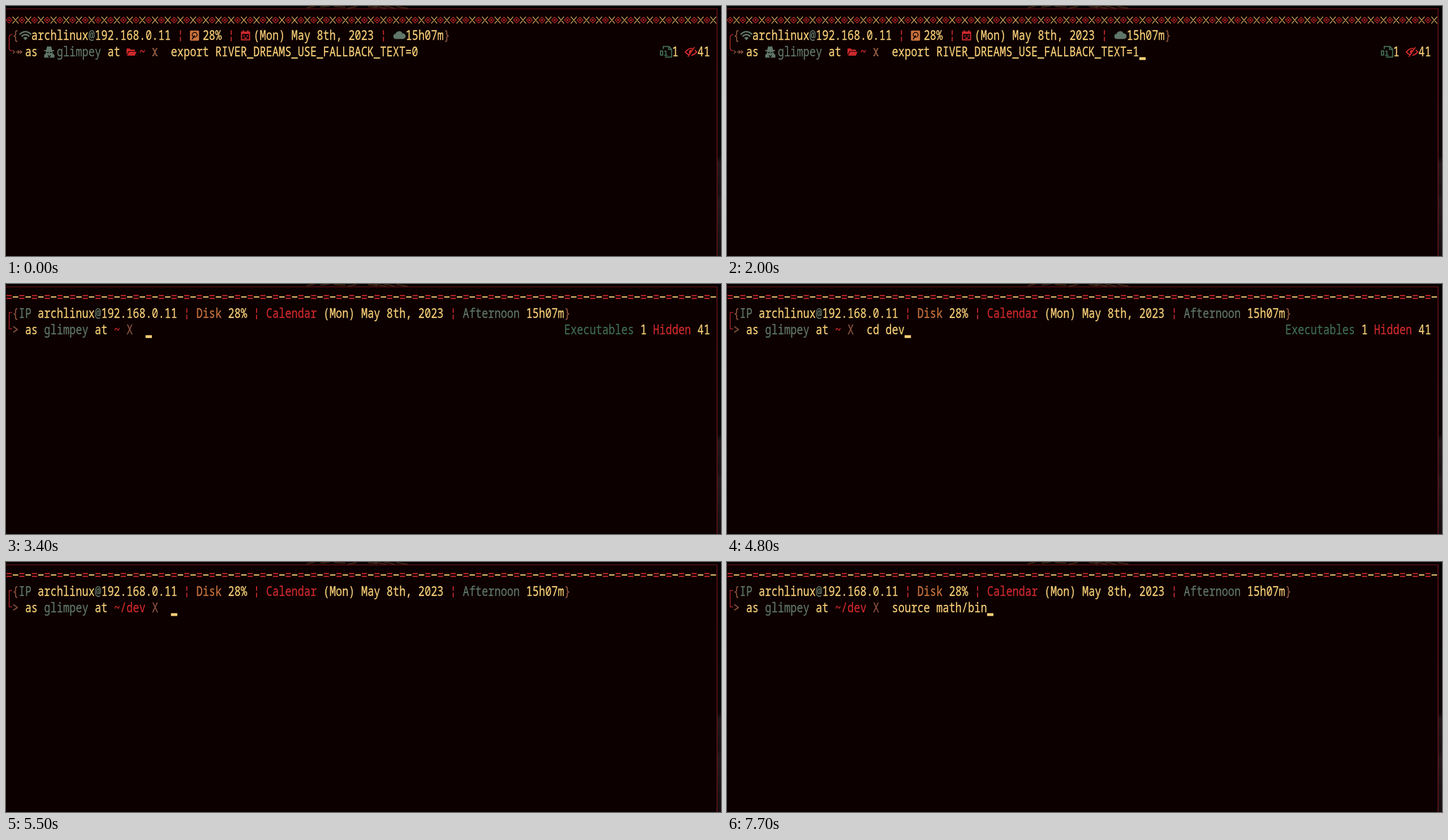
These frames come from a looping animation (1264 px wide and 443 px high, 8 s). An HTML page:

```html
<!DOCTYPE html>
<html lang="en">
<head>
<meta charset="utf-8">
<title>Shell prompt</title>
<style>
  html, body { margin: 0; width: 100%; height: 100%; overflow: hidden; background: #0d0000; }
  svg { display: block; width: 100vw; height: 100vh; }
  text { font: 500 18.69px "Noto Sans Mono", monospace; white-space: pre; stroke-width: .25; }
</style>
</head>
<body>
<svg viewBox="0 0 1264 443">
  <defs>
    <linearGradient id="edge" x1="0" y1="0" x2="0" y2="1">
      <stop offset="0" stop-color="#050203"/>
      <stop offset=".6" stop-color="#080405"/>
      <stop offset=".63" stop-color="#211719"/>
      <stop offset=".75" stop-color="#181012"/>
      <stop offset=".78" stop-color="#23191b"/>
      <stop offset="1" stop-color="#140d0f"/>
    </linearGradient>
  </defs>
  <rect width="1264" height="443" fill="#0d0000"/>
  <rect width="1264" height="4.5" fill="#070203"/>
  <rect x="1257" width="7" height="443" fill="url(#edge)"/>
  <path d="M532 3l14-3M556 2l16-2M580 1l20 1M604 4l16-3M640 1l16 2M650 0l22 4M668 0l20 4M690 1l20 3" stroke="#3f2516" stroke-width="2" fill="none"/>
  <path d="M0 5H1257V443" fill="none" stroke="#80191f" stroke-width="1.2"/>
  <g id="screen"></g>
</svg>
<script>
const GOLD = '#f7cf78', RED = '#cc292c', SAGE = '#5f7668', GREEN = '#3f6b51',
      ORANGE = '#c9733d', BROWN = '#8e5642', RUST = '#a8282a', BG = '#0d0000';
const COLS = 112, CELL = 1256 / COLS, ROW = 29, LOOP = 8000;
const USER = 'glimpey', DATE = '(Mon) May 8th, 2023', CLOCK = '15h07m', ADDRESS = '192.168.0.11';

const colX = col => col * CELL;
const baseline = row => 31 + row * ROW;
const shift = (row, body) => `<g transform="translate(0 ${row * ROW})">${body}</g>`;
const stroke = (d, color, width = 2) =>
  `<path d="${d}" fill="none" stroke="${color}" stroke-width="${width}"/>`;
const fill = (d, color) => `<path d="${d}" fill="${color}" fill-rule="evenodd"/>`;

// Consecutive color/string pairs set on the character grid.
function line(row, col, ...parts) {
  let out = '';
  for (let i = 0; i < parts.length; i += 2) {
    const [color, string] = [parts[i], parts[i + 1]];
    out += `<text transform="translate(${colX(col)} ${baseline(row)}) scale(1 1.22)" fill="${color}" stroke="${color}">${string}</text>`;
    col += string.length;
  }
  return out;
}

// Two alternating path builders, one per column.
function border(even, odd) {
  const d = ['', ''];
  for (let c = 0; c < COLS; c++) d[c % 2] += (c % 2 ? odd : even)(colX(c + 0.5));
  return d;
}

const [diamonds, crosses] = border(
  x => `M${x - 5.2} 25l5.2-5.2 5.2 5.2-5.2 5.2zM${x - 1.5} 25l1.5-1.5 1.5 1.5-1.5 1.5z`,
  x => `M${x - 5.2} 18.8L${x + 5.2} 31.2M${x + 5.2} 18.8L${x - 5.2} 31.2`);
const [equals, dashes] = border(
  x => `M${x - 4.6} 20.5h9.2M${x - 4.6} 25.6h9.2`,
  x => `M${x - 4.8} 23h9.6`);

const icons = {
  wifi: stroke('M24 50.5Q34.3 40.5 44.6 50.5M27.5 54Q34.3 47.4 41.1 54', SAGE, 2.6) +
        fill('M30.3 56.4Q34.3 53 38.3 56.4L34.3 60.8Z', SAGE),
  disk: fill('M327 43.5h12.5q1.8 0 1.8 1.8v14.4q0 1.8-1.8 1.8H327q-1.8 0-1.8-1.8V45.3q0-1.8 1.8-1.8z', ORANGE) +
        `<circle cx="333.5" cy="51" r="4.3" fill="none" stroke="${BG}" stroke-width="1.5"/>` +
        stroke('M329 59l4.5-7', BG, 2),
  calendar: stroke('M416.4 46.5h14.2v13.6h-14.2z', RED) +
            stroke('M416 47.5h15', RED, 4) + stroke('M419.5 43v4M427.5 43v4', RED, 2.2) +
            stroke('M419.5 53h2.4M425.5 53h2.4M421 57h5', RED, 2.2),
  cloud: fill('M689 58.5a4.7 4.7 0 0 1-.4-9.3 6.6 6.6 0 0 1 12.3-.7 5 5 0 0 1 1 10z', SAGE),
  spy: fill('M71 78l1.5-5.8q.4-1.2 1.7-.7 2.1.8 4.2 0 1.3-.5 1.7.7l1.5 5.8h3.4v2H67.500v-2z', SAGE) +
       fill('M70.500 80h11.600v3.800l2.500 1.700q1 .8 1 2.500v3.500H67.500V88q0-1.700 1-2.500l2-1.700z', SAGE) +
       stroke('M72.300 82.500h3.400M77.300 82.500h3.400M74.500 87l1.500 4M78.500 87l-1.500 4', BG, 1.5),
  folder: fill('M213 87V76.500q0-1.200 1.200-1.200h4.500l1.800 2h6.300q1.200 0 1.200 1.200V80h-11.500z' +
               'M217.300 81h13.400l-2.900 7H214z', RED),
  binary: stroke('M1162 76v-4.200h10l4.600 4.600V90.500H1165M1171.500 72v5h5', GREEN) +
          stroke('M1157 79.500h3.800v7.500h-3.800zM1164 80h2.600v7.500M1163.500 87.500h6', GREEN),
  hidden: stroke('M1201 81.500Q1211 69 1221 81.500Q1211 93 1201 81.500Z', RED, 2.2) +
          `<circle cx="1211" cy="81.5" r="3.8" fill="${RED}"/>` +
          stroke('M1207 90.500L1218.500 73', BG, 4) + stroke('M1205.500 90L1217 73', RED),
  cross: stroke('M258.500 75.500h2l5.500 12.500h2M267.500 75.500h-1.500l-5.500 12.500h-2', BROWN, 2.2)
};

const bar = (row, col) => {
  const y = baseline(row);
  return stroke(`M${colX(col + 0.5)} ${y - 17}v8m0 3.5v8`, RED, 1.8);
};

const iconPrompt =
  stroke(diamonds, '#b82628', 1.2) + stroke(crosses, '#dcb568', 1.3) +
  stroke('M11 50.5Q5.6 50.5 5.6 56V74Q5.6 79.5 11 79.5', RUST, 1.5) +
  stroke('M12 78.5l3.2 3-3.2 3M20.5 78.5l3.2 3-3.2 3M25 78.5l3.2 3-3.2 3M17.5 81.5h10.5', BROWN, 1.4) +
  line(1, 1, BROWN, '{') + icons.wifi +
  line(1, 4, GOLD, 'archlinux', SAGE, '@', GOLD, ADDRESS) + bar(1, 27) +
  icons.disk + line(1, 31, GOLD, '28%') + bar(1, 35) +
  icons.calendar + line(1, 39, GOLD, DATE) + bar(1, 59) +
  icons.cloud + line(1, 63, GOLD, CLOCK, BROWN, '}') +
  line(2, 3, GOLD, 'as') + icons.spy + line(2, 8, SAGE, USER) + line(2, 16, GOLD, 'at') +
  icons.folder + line(2, 21, RED, '~') + icons.cross +
  icons.binary + line(2, 105, GOLD, '1') + icons.hidden + line(2, 109, GOLD, '41');

const counts = line(2, 88, GREEN, 'Executables', GOLD, ' 1 ', RED, 'Hidden', GOLD, ' 41');

const textPrompt = path =>
  stroke(equals, RED) + stroke(dashes, GOLD, 2.2) +
  stroke('M11 50.5H5.6V79.5H11', RUST, 1.4) +
  line(1, 1, BROWN, '{', SAGE, 'IP', GOLD, ' archlinux', SAGE, '@', GOLD, ADDRESS) + bar(1, 28) +
  line(1, 30, ORANGE, 'Disk', GOLD, ' 28%') + bar(1, 39) +
  line(1, 41, RED, 'Calendar', GOLD, ' ' + DATE) + bar(1, 70) +
  line(1, 72, SAGE, 'Afternoon', GOLD, ' ' + CLOCK, BROWN, '}') +
  line(2, 1, BROWN, '&gt;') + line(2, 3, GOLD, 'as') + line(2, 6, SAGE, USER) +
  line(2, 14, GOLD, 'at') + line(2, 17, RED, path, BROWN, ' X');

const home = textPrompt('~') + counts;
const dev = textPrompt('~/dev');
const EXPORT = 'export RIVER_DREAMS_USE_FALLBACK_TEXT=';

// Each view: drawn content, plus row and column where input begins.
const views = {
  icons: { body: iconPrompt, row: 2, col: 26 },
  second: { body: iconPrompt + line(2, 26, GOLD, EXPORT + '1') + shift(3, home), row: 5, col: 22 },
  home: { body: home, row: 2, col: 22 },
  entered: { body: home + line(2, 22, GOLD, 'cd dev') + shift(3, dev), row: 5, col: 26 },
  dev: { body: dev, row: 2, col: 26 }
};

// Typing at one key per 100 ms.
const type = (time, view, before, keys) =>
  [...keys].map((_, i) => [time + i * 100, view, before + keys.slice(0, i + 1), true]);

// time, view, input, cursor shown
const steps = [
  [0, 'icons', EXPORT + '0', false],
  [200, 'icons', EXPORT + '0', true],
  [700, 'icons', EXPORT + '0', false],
  [1200, 'icons', EXPORT + '0', true],
  [1600, 'icons', EXPORT, true],
  [2000, 'icons', EXPORT + '1', true],
  [2400, 'second', '', true],
  [3000, 'second', '', false],
  [3300, 'second', '', true],
  [3400, 'home', '', true],
  [3900, 'home', '', false],
  ...type(4300, 'home', '', 'cd dev'),
  [5000, 'entered', '', true],
  [5500, 'dev', '', true],
  ...type(5900, 'dev', '', 'so'),
  ...type(6200, 'dev', 'so', 'ur'),
  ...type(6500, 'dev', 'sour', 'ce math'),
  ...type(7400, 'dev', 'source math', '/bin')
];

const screenGroup = document.getElementById('screen');
let shown;

function draw([, name, input, cursor]) {
  const { body, row, col } = views[name];
  screenGroup.innerHTML = body + line(row, col, GOLD, input) + (cursor
    ? `<rect x="${colX(col + input.length)}" y="${baseline(row) + 1.7}" width="${CELL}" height="5" fill="${GOLD}"/>`
    : '');
}

function tick() {
  const time = performance.now() % LOOP;
  const step = steps.findLast(s => s[0] <= time);
  if (step !== shown) draw(shown = step);
  requestAnimationFrame(tick);
}
tick();
</script>
</body>
</html>
```
